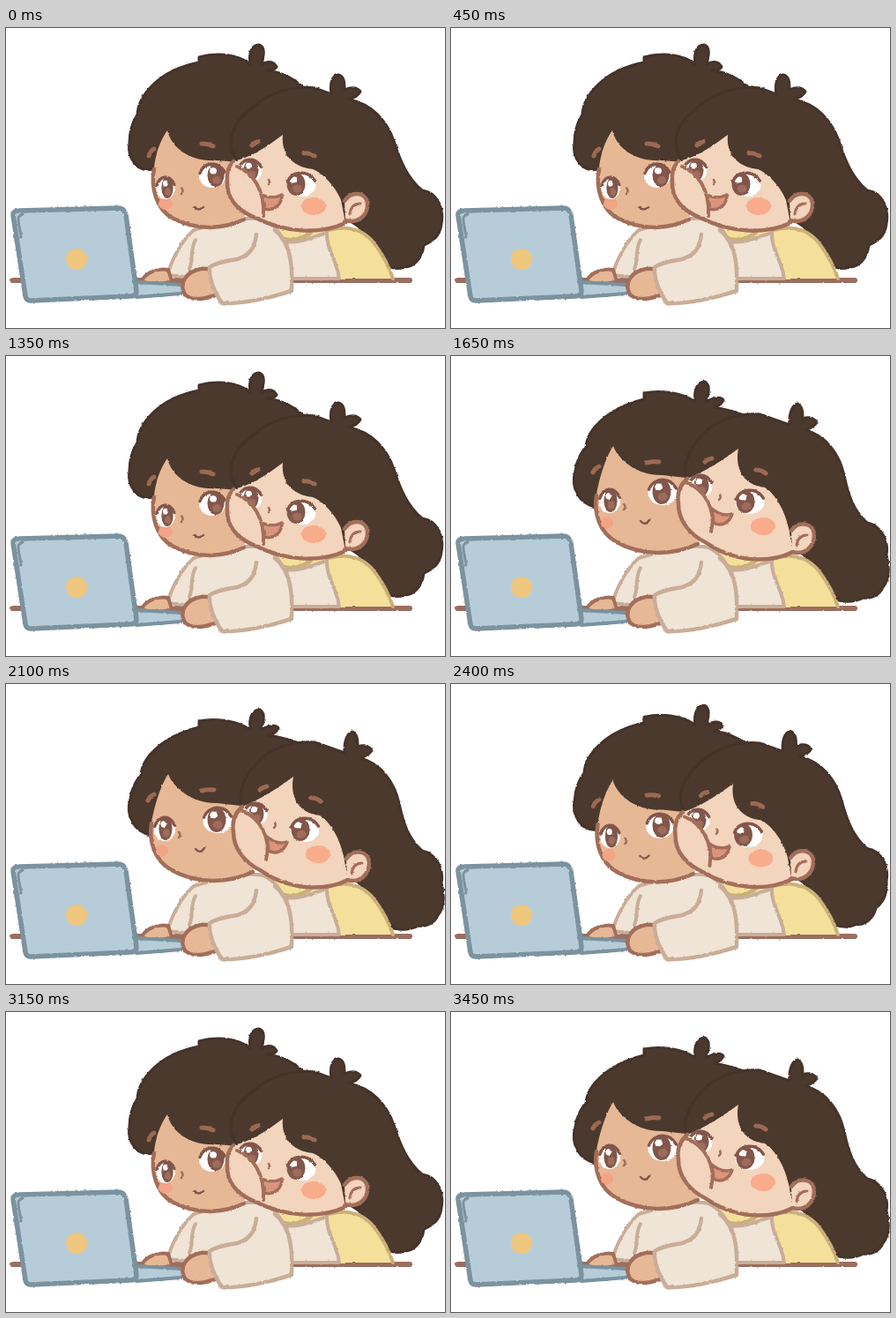
Animation of 498 by 340 pixels, one loop 3600 ms. Source, as an HTML page:

```html
<!DOCTYPE html>
<html lang="en">
<head>
<meta charset="utf-8">
<title>Looking at the laptop</title>
<style>
  html, body { margin: 0; width: 100%; height: 100%; overflow: hidden; background: #fff; }
  svg { display: block; width: 498px; height: 340px; }
  path { stroke-linecap: round; stroke-linejoin: round; }
</style>
</head>
<body>
<svg viewBox="0 0 498 340">
  <filter id="crayon" filterUnits="userSpaceOnUse" x="0" y="0" width="498" height="340" color-interpolation-filters="sRGB">
    <feTurbulence type="fractalNoise" baseFrequency=".28" seed="4"/>
    <feDisplacementMap in="SourceGraphic" scale="2.6" xChannelSelector="R" yChannelSelector="G"/>
  </filter>
  <g id="stage" filter="url(#crayon)"></g>
</svg>
<script>
const STEP = 150;
const HAIR = '#4b392d', HAIR_EDGE = '#45332a', LINE = '#a26e5a', BROWN = '#82564a';
const TAN = '#e7b896', PALE = '#f3d4bc', CREAM = '#efe4d5', CREAM_EDGE = '#c9ad98';
const YELLOW = '#f5e09b', YELLOW_EDGE = '#cbb07a', BLUE = '#b6cdd9', BLUE_EDGE = '#7b929f';

const stage = document.getElementById('stage');
const make = (tag, parent, attrs = {}) => {
  const el = document.createElementNS('http://www.w3.org/2000/svg', tag);
  for (const k in attrs) el.setAttribute(k, attrs[k]);
  return parent.appendChild(el);
};
const draw = (parent, d, fill, stroke = 'none', width = 0) =>
  make('path', parent, { d, fill, stroke, 'stroke-width': width });

const oval = (x, y, rx, ry) =>
  `M${x - rx} ${y} a${rx} ${ry} 0 1 0 ${2 * rx} 0 a${rx} ${ry} 0 1 0 ${-2 * rx} 0 Z`;

// Blend two paths that share the same commands.
const mix = (a, b, t) => {
  const ends = b.match(/-?\d+(\.\d+)?/g);
  let i = 0;
  return a.replace(/-?\d+(\.\d+)?/g, n => +(+n + (ends[i++] - n) * t).toFixed(2));
};

// Each part: [high pose, low pose, fill, stroke, width]
const blob = (a, b, fill) => [oval(...a), oval(...b), fill];
const line = (a, b, color, w) => [a, b, 'none', color, w];

const lash = (x, y, rx, ry, dx) => {
  const cx = x + dx;
  return `M${cx - rx * 1.4} ${y - ry * .2} C${cx - rx} ${y - ry * 1.1} ${cx + rx * .6} ${y - ry * 1.35} ${cx + rx * 1.4} ${y - ry * .3}`;
};
const eye = (a, b) => {
  const spot = (fx, fy, kx, ky, color) => {
    const at = ([x, y, rx, ry]) => [x + rx * fx, y + ry * fy, rx * kx, ry * ky];
    return blob(at(a), at(b), color);
  };
  const white = ([x, y, rx, ry, dx]) => [x + dx, y + 1, rx * 1.5, ry];
  return [
    blob(white(a), white(b), '#fff'),
    spot(0, 0, .95, 1, BROWN),
    spot(.1, .4, .5, .35, '#9d6c5a'),
    spot(-.3, -.4, .4, .28, '#fff'),
    line(lash(...a), lash(...b), BROWN, 3.5)
  ];
};

const back = [
  ['M166 160 C150 164 137 148 140 130 C140 118 144 106 149 98 C150 78 172 48 219 39 L219 33 C240 27 264 30 277 41 C275 28 279 19 287 19 C294 21 293 30 290 41 C298 36 305 39 307 44 C305 48 300 48 296 48 C312 50 328 58 340 70 L300 150 L200 165 Z',
   'M164 171 C146 168 135 150 141 130 C142 120 148 108 153 104 C154 84 176 60 219 49 L219 42 C238 38 264 42 277 52 C275 38 280 29 288 29 C294 33 293 42 289 52 C300 46 306 46 309 50 C306 56 302 57 297 58 C312 60 324 64 335 68 L300 150 L200 160 Z',
   HAIR, HAIR_EDGE, 3],
  ['M262 150 C250 135 254 112 272 97 C290 78 318 64 350 68 L369 75 C367 62 370 54 377 53 C384 55 384 62 384 70 C393 66 399 68 402 72 C399 78 394 79 389 81 C415 86 432 105 440 128 C447 150 455 170 472 184 C490 186 497 206 494 222 C492 238 482 242 474 246 C472 262 462 271 452 271 C444 274 436 272 430 268 L400 225 L300 160 Z',
   'M268 140 C262 130 268 108 280 95 C292 78 318 64 350 66 L384 78 C383 65 387 56 393 54 C399 57 399 64 399 71 C407 68 412 71 415 75 C412 81 406 82 402 84 C425 90 440 110 446 135 C450 155 456 175 472 189 C488 192 497 210 494 225 C498 242 497 254 490 262 C486 272 476 275 468 274 C458 279 448 279 440 277 L400 225 L300 160 Z',
   HAIR, HAIR_EDGE, 3]
];

const front = [
  // Boy
  ['M183 116 C188 136 208 152 240 150 L262 152 L275 200 L270 216 C245 228 215 230 190 216 C170 206 164 180 168 158 C170 140 176 126 183 116 Z',
   'M184 102 C190 118 212 136 240 135 L266 138 L285 200 L280 213 C250 227 215 226 188 211 C168 200 162 178 165 158 C168 138 176 114 184 102 Z',
   TAN],
  line('M270 217 C245 229 215 229 190 216 C170 206 164 180 168 160',
       'M280 213 C250 227 215 226 188 211 C168 200 162 178 165 158', LINE, 4.5),
  blob([181, 199, 8, 7], [177, 189, 7, 7], '#f2a486'),
  ...eye([183, 181, 7, 12, -2], [181, 164, 8, 13, -1]),
  ...eye([238, 167, 10, 13, -4], [239, 154, 11, 14, 1]),
  line('M199 181 Q202 185 199 188', 'M196 168 Q199 171 196 174', LINE, 2.5),
  line('M214 203 Q218 208 224 203', 'M215 187 Q220 193 225 186', BROWN, 2.5),
  line('M162 145 Q164 139 168 137', 'M161 132 Q163 127 168 125', '#9b6952', 5),
  line('M222 131 Q229 131 235 134', 'M222 121 Q229 119 236 120', '#9b6952', 5),
  // Girl
  ['M314 121 C312 140 322 157 348 160 C360 165 374 180 380 195 L385 221 C355 235 315 231 285 216 C264 208 250 194 251 174 C250 164 253 156 258 151 C278 147 298 133 314 121 Z',
   'M326 105 C322 126 330 146 356 149 C366 155 378 172 383 195 L388 222 C360 236 320 233 290 212 C270 202 258 186 258 168 C256 156 260 146 268 139 C288 131 310 117 326 105 Z',
   PALE],
  ['M384 196 C392 184 408 186 410 198 C411 212 400 222 385 218',
   'M386 198 C394 186 411 189 412 202 C412 216 402 226 387 222', PALE, LINE, 4.5],
  line('M390 211 C391 202 396 199 402 199', 'M392 215 C393 206 398 203 404 203', LINE, 3),
  blob([349, 202, 14, 10], [354, 193, 14, 10], '#f8ac8c'),
  ...eye([278, 161, 9, 12, -1], [284, 147, 9, 12, -1]),
  ...eye([329, 177, 11, 13, 6], [334, 165, 11, 13, 5]),
  line('M298 172 Q300 175 298 177', 'M305 157 Q307 160 304 163', LINE, 2.5),
  ['M290 189 C298 193 307 192 313 189 C313 200 304 208 293 205 Z',
   'M296 173 C304 180 312 181 319 179 C316 189 306 194 298 189 Z', '#dc947d', LINE, 3.5],
  line('M279 133 Q281 130 286 129', 'M288 120 Q291 117 296 116', '#9b6952', 5),
  line('M338 142 Q344 141 350 145', 'M346 129 Q352 129 357 133', '#9b6952', 5),
  // Raised hand
  ['M258 151 C268 157 290 172 292 192 L292 213 C272 211 254 204 252 184 C250 170 252 160 258 151 Z',
   'M268 139 C280 145 296 164 297 182 L295 199 C276 198 260 186 258 168 C256 156 260 146 268 139 Z', PALE],
  line('M262 157 C279 164 294 182 292 213', 'M268 144 C286 150 302 174 295 199', LINE, 4),
  line('M385 221 C355 235 315 231 285 216 C264 208 250 194 251 174 C250 164 253 156 258 151',
       'M388 222 C360 236 320 233 290 212 C270 202 258 186 258 168 C256 156 260 146 268 139', LINE, 4.5)
];

const body = [
  ['M7 286 H458', 'none', '#9b6e60', 6],
  ['M290 215 L385 224 L385 285 L320 285 Z', YELLOW],
  ['M304 231 C314 242 330 243 346 232', YELLOW, YELLOW_EDGE, 4],
  ['M366 231 C390 222 408 230 419 246 C428 258 435 272 439 284 L380 284 C379 264 366 254 366 231 Z', YELLOW],
  ['M366 229 C390 223 408 230 419 246 C428 258 435 272 439 284', 'none', YELLOW_EDGE, 4],
  ['M318 242 C332 245 350 236 364 232 C363 250 375 262 378 284 L324 284 Z', CREAM, CREAM_EDGE, 4],
  ['M213 229 C200 240 188 262 183 280 L212 283 L240 290 L320 288 C325 262 318 230 292 217 C270 212 235 222 213 229 Z', CREAM, CREAM_EDGE, 4],
  ['M215 240 C208 252 213 262 208 273', 'none', CREAM_EDGE, 4],
  ['M153 288 C158 277 172 272 184 274 L188 287 C178 291 166 290 153 288 Z', TAN, LINE, 4],
  ['M148 288 L198 291 C204 294 203 299 198 301 L148 305 Z', BLUE, BLUE_EDGE, 4],
  ['M236 275 C224 270 206 274 201 288 C198 302 206 307 218 307 C228 307 234 304 240 302 Z', TAN, LINE, 4.5],
  ['M284 234 C282 250 276 258 262 262 C250 264 238 266 231 271 C230 284 236 296 240 304 L245 312 C268 313 300 306 324 298 C325 275 325 245 305 229', CREAM, CREAM_EDGE, 4.5],
  ['M8 212 Q8 207 15 207 L128 204 Q134 204 136 212 L148 298 Q148 304 141 304 L28 309 Q23 309 22 304 Z', BLUE, BLUE_EDGE, 5.5],
  ['M17 237 L14 218 Q13 213 19 211', 'none', BLUE_EDGE, 3],
  [oval(80, 262, 12, 12), '#efc67d']
];

const poses = parts => [0, .5, 1].map(t => {
  const g = make('g', stage);
  for (const [a, b, ...paint] of parts) draw(g, mix(a, b, t), ...paint);
  return g;
});

const backs = poses(back);
const still = make('g', stage);
for (const part of body) draw(still, ...part);
const fronts = poses(front);

let shown = -1;
function tick() {
  const now = Math.floor(performance.now() / STEP) % 3;
  if (now !== shown) {
    shown = now;
    for (const set of [backs, fronts])
      set.forEach((g, i) => g.setAttribute('display', i === now ? 'inline' : 'none'));
  }
  requestAnimationFrame(tick);
}
tick();
</script>
</body>
</html>
```
